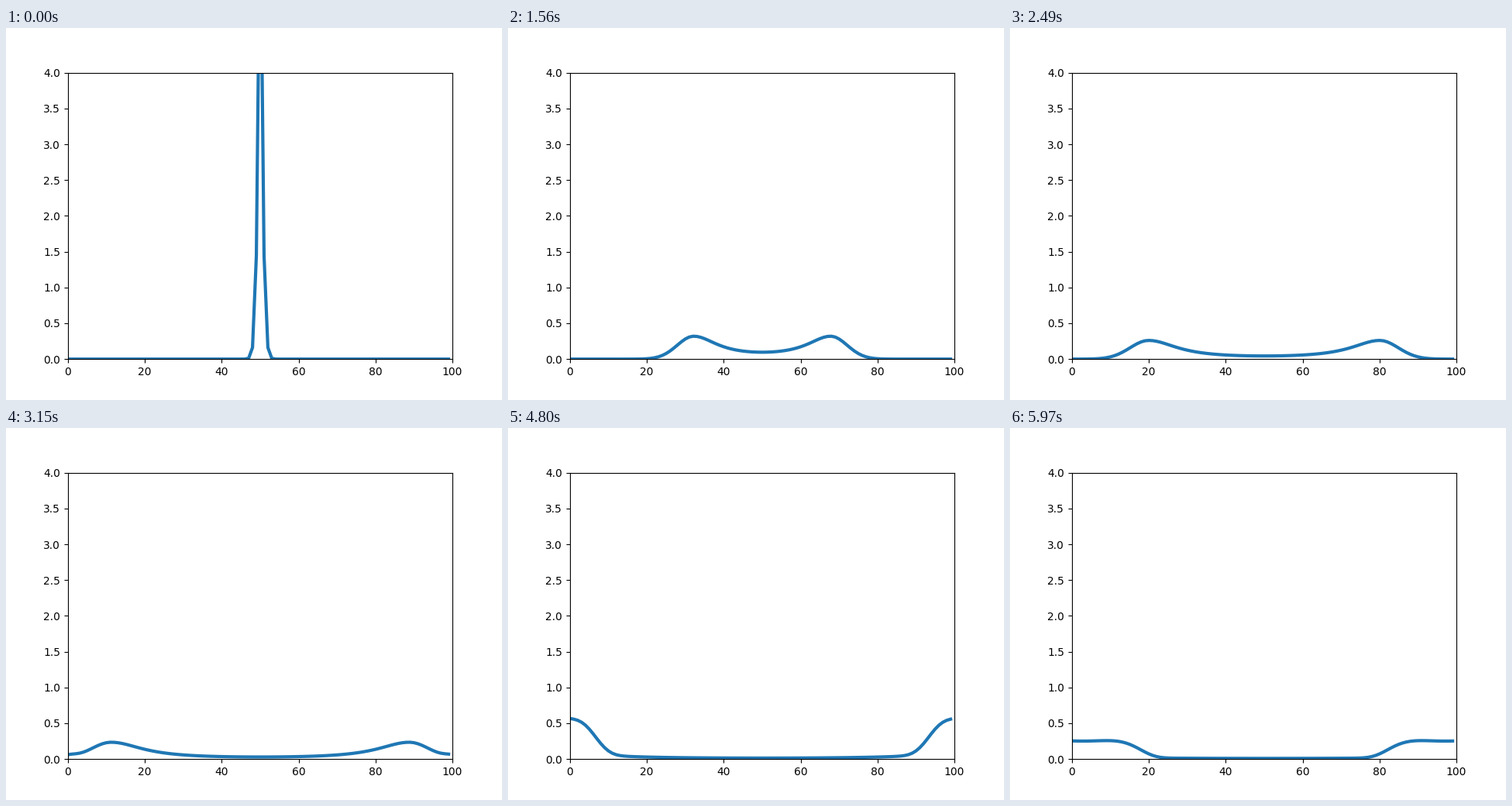
A matplotlib script that plays this animation: 640x480 px, repeating every 6 s.

```python
import numpy as np
import matplotlib.pyplot as plt
from matplotlib.animation import FuncAnimation

N = 100          # cells on a ring
MASS = 9.8       # conserved total
FRAMES = 200
MID = N // 2
MEET = 129.3     # when the two pulses collide at the ends

x = np.arange(N)
dist = np.abs(x - MID)      # distance from the initial spike
wall = MID - dist           # distance from the meeting point


def smoothstep(t, start, end):
    u = np.clip((t - start) / (end - start), 0, 1)
    return u * u * (3 - 2 * u)


def spike(t):
    """Initial spike spreading by diffusion on the ring."""
    k = 2 * np.pi * np.fft.fftfreq(N)
    spread = np.fft.ifft(np.exp(-0.45 * t ** 1.5 * (1 - np.cos(k)))).real
    return MASS * np.roll(spread, MID)


def pulses(t):
    """Two mirrored pulses: long tails inside, Gaussian fronts outside."""
    pos = max(0, 0.396 * t - 3.2 + 2.8 * np.exp(-t / 13))
    height = 1.83 * t ** -0.44 + 2 * np.exp(-t / 6)
    width = 6 * (t / 28) ** 0.39

    def bell(d):
        return 1 / (1 + (d / width) ** 2)

    amp = height / (1 + bell(2 * pos))
    inner = amp * width * np.arctan(2 * pos / width)
    front = (MASS / 2 - inner) / (np.sqrt(np.pi / 2) * height)
    tail = amp * (bell(dist - pos) + bell(dist + pos))
    edge = height * np.exp(-0.5 * ((dist - pos) / front) ** 2)
    return np.where(dist > pos, edge, tail)


def pile_up(t, rho):
    """Mass that passed the ends gathers there and spreads back inward."""
    level = 1.14 * np.exp((128 - t) / 48) / (1 + np.exp((MEET - t) / 7))
    height = max(level - rho[0], 1e-6)
    age = np.clip((t - 128) / 72, 0, 1)

    def shape(u):
        return (1 + 0.45 * age ** 3 * u ** 2) * np.exp(-u ** (2 + 3 * age ** 1.7))

    area = 3 * shape(np.linspace(0, 3, 301)).mean()
    width = max(3, (MASS - rho.sum()) / (2 * height * area))
    return height * shape(wall / width)


def density(t):
    mix = smoothstep(t, 4, 14)
    rho = mix * pulses(t) + (1 - mix) * spike(t)
    if t > 96:
        rho = rho + pile_up(t, rho)
    return rho


fig, ax = plt.subplots(figsize=(6.4, 4.8), dpi=100)
ax.set_xlim(0, 100)
ax.set_ylim(0, 4)
line, = ax.plot(x, density(1), lw=3)


def update(i):
    line.set_ydata(density(i + 1))
    return line,


anim = FuncAnimation(fig, update, frames=FRAMES, interval=30,
                     repeat=True, repeat_delay=0, blit=False)
plt.show()
```
